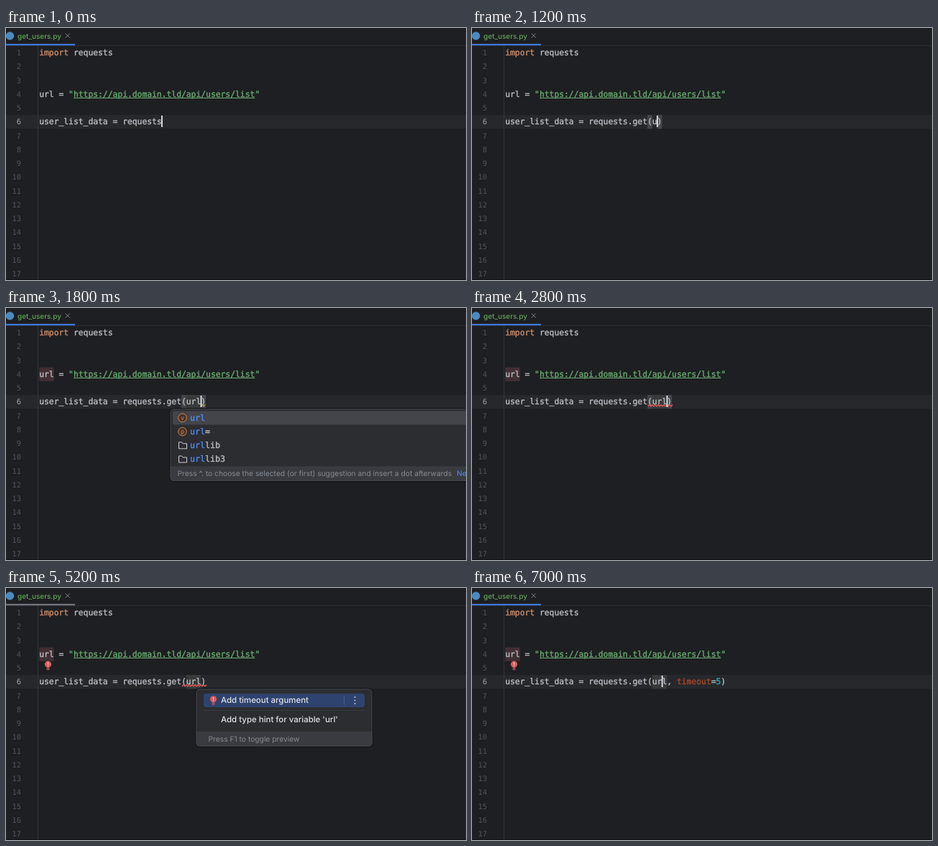
An HTML page for the animation above (7200 ms loop, 640 by 351 pixels).

```html
<!DOCTYPE html>
<html lang="en">
<head>
<meta charset="utf-8">
<title>Editor: add timeout argument</title>
<style>
  html, body { margin: 0; width: 100%; height: 100%; overflow: hidden; background: #1e1f22; }
  svg { display: block; width: 100%; height: 100%; }
  text { white-space: pre; text-rendering: geometricPrecision; color: #bcbec4; fill: currentColor; }
  .code, .item { stroke: currentColor; stroke-width: 0.35; }
  .code { font: 11.33px "DejaVu Sans Mono", monospace; }
  .item { font: 11.63px "DejaVu Sans Mono", monospace; }
  .num { font: 10.3px "DejaVu Sans Mono", monospace; text-anchor: end; color: #4f545d; }
  .tab { font: 500 9.95px Inter, sans-serif; color: #62a356; }
  .menu { font: 500 11.45px Inter, sans-serif; color: #dfe1e5; }
  .hint { font: 10.28px Inter, "DejaVu Sans", sans-serif; color: #868a91; }
  .badge { font: 8.5px "DejaVu Sans Mono", monospace; text-anchor: middle; }
  .kw { color: #cf8e6d; } .str { color: #6aab73; } .arg { color: #aa4926; }
  .lit { color: #2aacb8; } .hit { color: #548af7; } .dim { color: #70747b; }
  tspan { fill: currentColor; }
  .code tspan, .item tspan { stroke: currentColor; }
</style>
</head>
<body>
<svg viewBox="0 0 640 351" preserveAspectRatio="none"><g id="page"></g><g id="live"></g></svg>
<script>
const LOOP = 7200, CHAR = 6.82, LEFT = 46.2, ROW = 19.25;
const col = n => LEFT + CHAR * n;
const mid = line => 34.5 + ROW * (line - 1);

const rect = (x, y, w, h, fill, more = '') =>
  `<rect x="${x}" y="${y}" width="${w}" height="${h}" fill="${fill}" ${more}/>`;
const text = (x, y, cls, body) => `<text x="${x}" y="${y}" class="${cls}">${body}</text>`;
const span = (cls, body) => `<tspan class="${cls}">${body}</tspan>`;
const path = (d, stroke, width = 1) =>
  `<path d="${d}" fill="none" stroke="${stroke}" stroke-width="${width}"/>`;
const code = (line, body) => text(LEFT, mid(line) + 3.6, 'code', body);
const mark = (from, count, line, fill) =>
  rect(col(from), mid(line) - 9.6, CHAR * count, ROW, fill);

function squiggle(x, end, color) {
  let d = `M${x} 137`;
  for (let up = true; x < end; up = !up) d += `L${x += 2} ${up ? 134.7 : 137}`;
  return path(d, color, 1.3);
}

function bulb(x, y) {
  return `<circle cx="${x}" cy="${y - 1.2}" r="4.6" fill="#db5c5c"/>` +
    path(`M${x - 2} ${y + 4.4}h4M${x - 2} ${y + 6.3}h4`, '#db5c5c', 1.1) +
    path(`M${x} ${y - 4}v3.6m0 1v1.2`, '#f3dada', 1.1);
}

function badge(x, y, letter, color, fill) {
  return `<circle cx="${x}" cy="${y}" r="5.8" fill="${fill}" stroke="${color}"/>` +
    `<text x="${x}" y="${y + 2.8}" class="badge" style="color:${color}">${letter}</text>`;
}

// panel with a dark rim outside and a faint one inside
function popup(x, y, w, h, footer) {
  const foot = y + h - footer;
  return rect(x - 0.5, y - 0.5, w + 1, h + 1, '#2b2d30', 'rx="5.5" stroke="#151618" stroke-width="1.6"') +
    `<path d="M${x} ${foot}h${w}v${footer - 5}q0 5 -5 5h${10 - w}q-5 0 -5 -5z" fill="#393b40"/>` +
    rect(x + 0.5, y + 0.5, w - 1, h - 1, 'none', 'rx="4.5" stroke="#43464b"');
}

function getPopup(typed) {
  return popup(200.5, 139.5, 460, 43.5, 20) +
    rect(204, 143.5, 450, 18.5, '#43454a', 'rx="3"') +
    badge(217.5, 153, 'f', '#db5c5c', '#402929') +
    text(228.5, 156.7, 'item', span('hit', 'get'.slice(0, typed)) + 'get'.slice(typed) +
      span('dim', '(url, params, data, headers, cookies, files, …')) +
    text(589, 156.7, 'item dim', 'requests') +
    text(210.5, 176.1, 'hint', 'Press ⏎ to insert, ⇥ to replace') +
    text(365.7, 176.1, 'hint hit', 'Next Tip');
}

function urlPopup(typed) {
  const rows = ['url', 'url=', 'urllib', 'urllib3'].map((name, i) => {
    const y = 153 + 19.2 * i;
    const icon = i < 2
      ? badge(245.5, y, 'vp'[i], '#d9824f', '#45322b')
      : path(`M240.5 ${y - 4.5}h4l1.7 2h5.3v7h-11z`, '#ced0d6');
    return icon + text(256, y + 3.7, 'item', span('hit', name.slice(0, typed)) + name.slice(typed));
  });
  return popup(228.5, 140.5, 430, 100.5, 20.5) +
    rect(232, 143.5, 420, 19, '#43454a', 'rx="3"') + rows.join('') +
    text(238.5, 233.8, 'hint',
      'Press ^. to choose the selected (or first) suggestion and insert a dot afterwards') +
    text(627, 233.8, 'hint hit', 'Next Tip');
}

function fixPopup() {
  return popup(264.5, 140.5, 245, 80, 20.5) +
    rect(275, 147, 224, 19, '#2e436e', 'rx="3.5"') +
    path('M470.5 150v13', '#455a84') +
    [152, 156.5, 161].map(y => `<circle cx="485.5" cy="${y}" r="0.9" fill="#ced0d6"/>`).join('') +
    bulb(288.5, 156) +
    text(299, 160.3, 'menu', 'Add timeout argument') +
    path('M275 170.5h224', '#393b40') +
    text(299, 187.3, 'menu', "Add type hint for variable 'url'") +
    text(281.5, 213.7, 'hint', 'Press F1 to toggle preview');
}

// start time, text after "requests", caret column
const typing = [
  [0, '', 25], [200, '.', 26], [400, '.g', 27], [600, '.ge', 28], [800, '.get', 29],
  [1000, '.get()', 30], [1200, '.get(u)', 31], [1400, '.get(ur)', 32],
  [1600, '.get(url)', 33], [3200, '.get(url)', 32],
  [5800, `.get(url, ${span('arg', 'timeout')}=${span('lit', '5')})`, 32]
];

function draw(t) {
  const within = (a, b) => t >= a && t < b;
  const [, tail, caret] = typing.findLast(step => t >= step[0]);
  const fixing = within(3600, 5600);
  let out = rect(0, 22, 96, 2.3, fixing ? '#6f737a' : '#3f76d8');

  if (t >= 1600) out += mark(0, 3, 4, '#402f33') + mark(30, 3, 6, '#373b39');
  if (within(1000, 3200)) out += mark(29, 1, 6, '#43454a') + mark(caret, 1, 6, '#43454a');
  out += code(4, `url = ${span('str', '"https://api.domain.tld/api/users/list"')}`) +
    path(`M${col(7)} 97.5H${col(44)}`, '#6aab73') +
    code(6, 'user_list_data = requests' + tail);

  if (within(1600, 2600)) out += squiggle(271, 277, '#b59a5c');
  if (within(2600, 6000)) out += squiggle(245, 278, '#dc585c');
  if (t >= 3600) out += bulb(58.5, 107.5);
  if (t < 3600 || within(5800, 6600) || t >= 7000)
    out += rect(col(caret) - 0.7, 122, 1.8, 16, '#e4e6ea');

  if (within(600, 1000)) out += getPopup(t < 800 ? 2 : 3);
  if (within(1400, 2200)) out += urlPopup(t < 1600 ? 2 : 3);
  if (fixing) out += fixPopup();
  return out;
}

const page = document.getElementById('page'), live = document.getElementById('live');
let still = rect(0, 0, 640, 351, '#1e1f22') +
  rect(0, 24, 640, 1, '#2b2d30') +
  '<circle cx="5.5" cy="11" r="5.7" fill="#4b8bbe"/>' +
  text(16, 14.8, 'tab', 'get_users.py') +
  path('M82.7 7.7l6 6m0-6l-6 6', '#7d8188') +
  rect(0, 121, 640, 19, '#26282c') + rect(44, 25, 1, 326, '#313438') +
  rect(0, 350, 640, 1, '#131416') +
  code(1, span('kw', 'import') + ' requests');
for (let n = 1; n <= 17; n++)
  still += `<text x="21" y="${mid(n) + 3.6}" class="num"${n === 6 ? ' style="color:#a1a3ab"' : ''}>${n}</text>`;
page.innerHTML = still;

const start = performance.now();
let shown;
function tick() {
  const next = draw((performance.now() - start) % LOOP);
  if (next !== shown) live.innerHTML = shown = next;
  requestAnimationFrame(tick);
}
tick();
</script>
</body>
</html>
```
